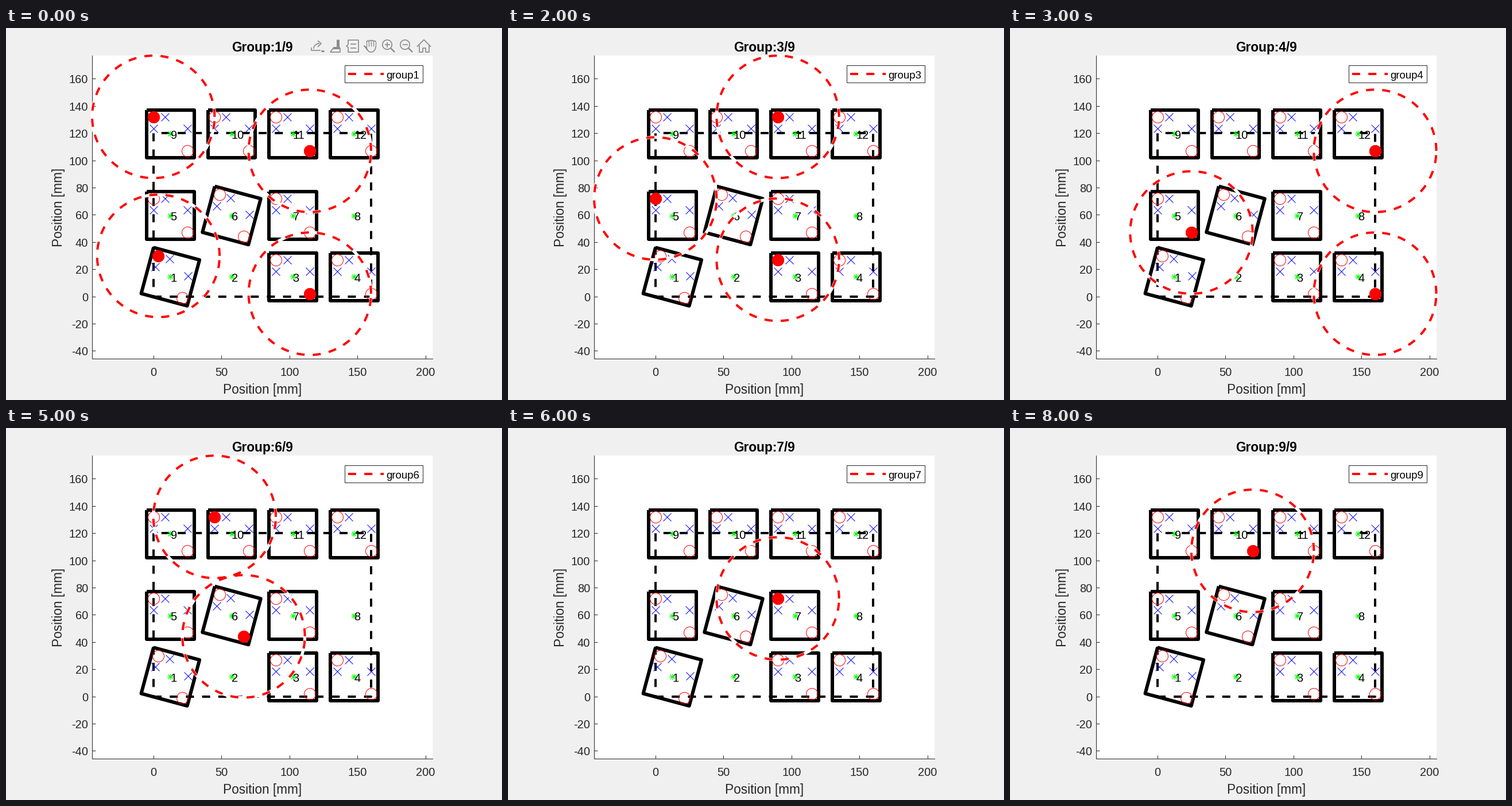
Recreate the animation shown at these times as a matplotlib script. Size 864x648 px, loop 9000 ms.

```python
import numpy as np
import matplotlib.pyplot as plt
from matplotlib.animation import FuncAnimation
from matplotlib.patches import Rectangle

W, H, DPI = 864, 648, 96
PT = 72 / DPI                        # points per pixel
SCALE, X0, Y0 = 2.37, 256.7, 467.6   # pixels per mm, pixel place of the data zero
LEFT, RIGHT, TOP, BOTTOM = 150, 743, 48, 576
INK, GREY, RED = "#262626", "#8c8c8c", "#ff0000"
DASHED = dict(lw=3, ls=(0, (3.5, 3.55)), dash_capstyle="butt")
RADIUS = 45                          # holes in one group keep two radii apart
HALF, HOLE = 17.5, 12.5              # tile half side, hole offset
EMPTY, TILTED = (2, 8), (1, 6)
ROWS = (14.5, 59.5, 119.5)

plt.rcParams["font.family"] = "Liberation Sans"
fig = plt.figure(figsize=(W / DPI, H / DPI), dpi=DPI, facecolor="#f0f0f0")


def centre(tile):
    row, col = divmod(tile - 1, 4)
    return np.array([12.5 + 45 * col, ROWS[row]])


def place(tile, pts):
    """Tile-local points in plot coordinates."""
    a = np.radians(-15 if tile in TILTED else 0)
    rot = np.array([[np.cos(a), -np.sin(a)], [np.sin(a), np.cos(a)]])
    return np.asarray(pts) @ rot.T + centre(tile)


def split(points):
    """Greedy groups whose members lie more than two radii apart."""
    groups, rest = [], list(points)
    while rest:
        group, later = [], []
        for p in rest:
            far = all(np.hypot(*(p - q)) > 2 * RADIUS + 1e-6 for q in group)
            (group if far else later).append(p)
        groups.append(np.array(group))
        rest = later
    return groups


# Plot area
ax = fig.add_axes([LEFT / W, 1 - BOTTOM / H, (RIGHT - LEFT) / W, (BOTTOM - TOP) / H])
ax.set_xlim((LEFT - X0) / SCALE, (RIGHT - X0) / SCALE)
ax.set_ylim((Y0 - BOTTOM) / SCALE, (Y0 - TOP) / SCALE)
xticks, yticks = range(0, 201, 50), range(-40, 161, 20)
ax.set_xticks(xticks, labels=[])
ax.set_yticks(yticks, labels=[])
ax.tick_params(direction="in", length=6 * PT, width=PT, color=INK)
ax.set_axisbelow(True)
for side, spine in ax.spines.items():
    spine.set(visible=side in ("left", "bottom"), linewidth=PT, edgecolor=INK)

# Overlay in pixel coordinates, y down
top = fig.add_axes([0, 0, 1, 1])
top.set(xlim=(0, W), ylim=(H, 0))
top.axis("off")


def label(x, y, s, size, ha="center", color=INK, **kw):
    return top.text(x, y, s, fontsize=size, ha=ha, va="baseline", color=color, **kw)


for v in xticks:
    label(X0 + SCALE * v + 0.3, 606, str(v), 15)
for v in yticks:
    label(143, Y0 - SCALE * v + 8, str(v), 15, "right")
label(446.5, 637, "Position [mm]", 17)
label(98, 312.5, "Position [mm]", 17, rotation=90, rotation_mode="anchor")
title = label(446.5, 40.5, "", 17, color="black", weight="bold")

# Tiles
SQUARE = HALF * np.array([(-1, 1), (1, 1), (1, -1), (-1, -1), (-1, 1)])
HOLES = HOLE * np.array([(-1, 1), (1, -1)])
CROSSES = [(-4, HOLE), (-HOLE, 4), (HOLE, 4)]
holes = []
for n in range(1, 13):
    cx, cy = centre(n)
    if n not in EMPTY:
        pair = place(n, HOLES)
        holes.extend(pair)
        ax.plot(*place(n, SQUARE).T, color="black", lw=4.5, zorder=2,
                solid_capstyle="butt", solid_joinstyle="round")
        ax.plot(*place(n, CROSSES).T, "x", ms=10.5, mec="#0000ff", mew=PT, zorder=3.1)
        ax.plot(*pair.T, "o", ms=15, mfc="none", mec=RED, mew=PT, zorder=3.2)
    ax.plot(cx, cy, marker=(8, 2, 0), ms=8, mec="#00ff00", mew=PT, zorder=3.3)
    ax.text(cx, cy - 3.5, str(n), fontsize=15, color="black", va="baseline", zorder=4)

ax.plot([0, 160, 160, 0, 0], [0, 0, 120, 120, 0], color="black", zorder=3, **DASHED)
GROUPS = split(holes)

# Group rings: white backing below red dashes
dots, = ax.plot([], [], "o", ms=15, color=RED, mew=PT, zorder=4.5)
backing, = ax.plot([], [], color="white", lw=4, clip_on=False, zorder=5)
rings, = ax.plot([], [], color=RED, clip_on=False, zorder=6, **DASHED)

# Legend
top.add_patch(Rectangle((590, 65), 136, 30, fc="white", ec=INK, lw=PT))
top.plot([596, 658], [79.5, 79.5], color=RED, **DASHED)
legend = label(662.3, 88, "", 14, "left", color="black")

# Toolbar icons, each drawn around its own centre
tools = []


def stroke(x, dx, dy, lw=1.7):
    tools.extend(top.plot(x + np.asarray(dx), 31 + np.asarray(dy), color=GREY,
                          lw=lw * PT, solid_capstyle="butt"))


def arc(x, dx, dy, rx, ry, start=0, stop=360):
    t = np.radians(np.linspace(start, stop, 40))
    stroke(x, dx + rx * np.cos(t), dy + ry * np.sin(t))


def export(x):
    stroke(x, [-10, -10, 6], [3, 8, 8])
    arc(x, 4, 5, 10, 9, 180, 270)
    stroke(x, [1, 7, 1], [-9, -4, 2])
    stroke(x, [7, 12], [9, 9], 3)


def brush(x):
    stroke(x, [5, 5], [-11, 3], 5)
    stroke(x, [-3, 9], [4, 4], 4)
    stroke(x, [-3, -8, 9, 9], [4, 11, 11, 4])


def datatip(x):
    stroke(x, [-8, -8, 10, 10, -8, -8, -11, -8], [-2, -10, -10, 11, 11, 3, 0.5, -2])
    for y in (-3, 4):
        stroke(x, [-4, 6], [y, y])


def hand(x):
    for k in range(4):
        arc(x, 4 * k - 5, -8 + abs(k - 1.5), 2, 2, 180, 360)
    for k in range(5):
        stroke(x, [4 * k - 7] * 2, [-7, 1], 1.3)
    arc(x, 1, 1, 8, 10, 0, 180)
    stroke(x, [-7, -11, -5], [4, 0, 8])


def magnifier(x, plus):
    arc(x, -2, -2, 8.2, 8.2)
    stroke(x, [4, 11], [4, 11], 2.4)
    stroke(x, [-6.5, 2.5], [-2, -2])
    if plus:
        stroke(x, [-2, -2], [-6.5, 2.5])


def home(x):
    stroke(x, [-12, 0, 12], [1.5, -10.5, 1.5])
    stroke(x, [-8.5, -8.5, -2.5, -2.5, 2.5, 2.5, 8.5, 8.5],
           [-1, 11, 11, 4, 4, 11, 11, -1])


for k, icon in enumerate([export, brush, datatip, hand,
                          lambda x: magnifier(x, True),
                          lambda x: magnifier(x, False), home]):
    icon(542 + 31 * k)

ANGLES = np.radians(np.arange(0, 361, 2))
RING = RADIUS * np.column_stack([np.cos(ANGLES), np.sin(ANGLES)])
RING = np.vstack([RING, [np.nan, np.nan]])


def update(i):
    hubs = GROUPS[i]
    path = np.vstack([hub + RING for hub in hubs])
    backing.set_data(*path.T)
    rings.set_data(*path.T)
    dots.set_data(*hubs.T)
    title.set_text(f"Group:{i + 1}/{len(GROUPS)}")
    legend.set_text(f"group{i + 1}")
    for tool in tools:
        tool.set_visible(i == 0)
    return [backing, rings, dots, title, legend, *tools]


anim = FuncAnimation(fig, update, frames=len(GROUPS), interval=1000,
                     init_func=lambda: update(0), repeat=True)
plt.show()
```
